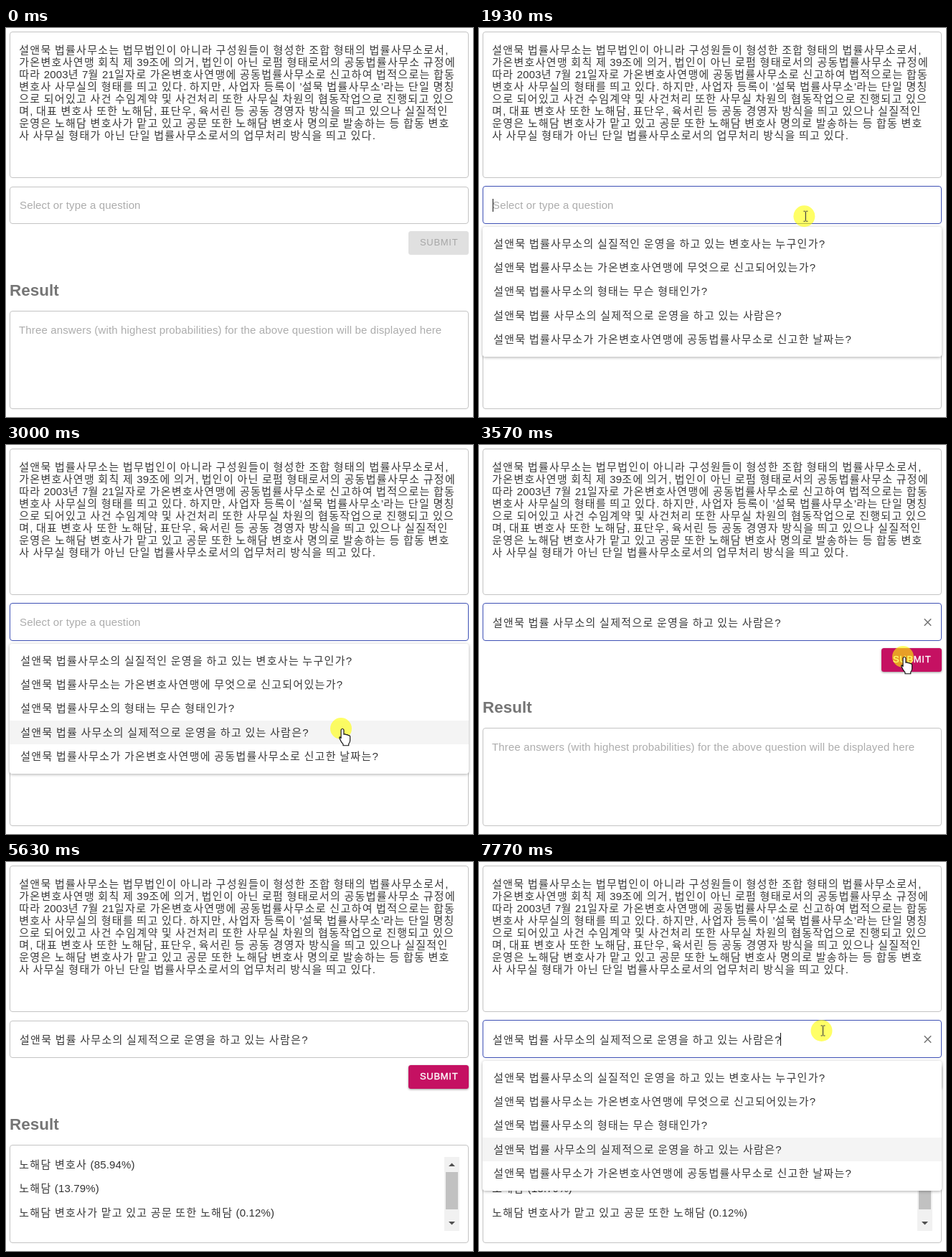
An HTML page for the animation above (8 s loop, 651 by 542 pixels).

```html
<!DOCTYPE html>
<html lang="ko">
<head>
<meta charset="utf-8">
<title>Question answering demo</title>
<style>
  html, body { margin: 0; width: 100%; height: 100%; overflow: hidden; background: #fff; }
  svg { display: block; width: 100%; height: 100%; }
  text {
    font: 15px "Liberation Sans", "Noto Sans CJK KR", "Noto Sans CJK", sans-serif;
    letter-spacing: .14px; fill: #333; white-space: pre;
  }
  .ko { font-weight: 300; letter-spacing: 1.32px; fill: #3a3a3a; }
  .hint { fill: #acacac; }
  .box { fill: #fff; stroke: #c4c4c4; }
  #title { font-size: 22.5px; font-weight: 700; letter-spacing: 0; fill: #757575; }
  #label { font-size: 13px; letter-spacing: .7px; }
  #menu rect.paper { fill: #fff; filter: drop-shadow(0 1px 2px rgba(0,0,0,.32)); }
</style>
</head>
<body>
<svg viewBox="0 0 651 542" xmlns="http://www.w3.org/2000/svg">
  <rect class="box" x="5.5" y="5.5" width="639" height="203" rx="3.5"/>
  <g id="passage"></g>

  <rect id="input" class="box" x="5.5" width="639" rx="3.5"/>
  <text id="ask" class="hint" x="19" y="252">Select or type a question</text>
  <g id="value"></g>
  <path id="clear" d="M620.8 242.3l9.4 9.4m0-9.4l-9.4 9.4" stroke="#757575" stroke-width="1.6"/>
  <path id="caret" stroke="#111"/>

  <rect id="button" x="561" y="283" width="84" height="33" rx="3.5"/>
  <text id="label" x="577" y="303">SUBMIT</text>
  <path id="spinner" fill="none" stroke="#fff" stroke-width="2"/>

  <g id="result">
    <text id="title" x="5" y="373">Result</text>
    <rect class="box" x="5.5" y="394.5" width="639" height="136" rx="3.5"/>
    <text id="wait" class="hint" x="18" y="426">Three answers (with highest probabilities) for the above question will be displayed here</text>
    <g id="answers">
      <rect x="611" y="411" width="21" height="103" fill="#f1f1f1"/>
      <rect x="613" y="432" width="17" height="52" fill="#c1c1c1"/>
      <path d="M617 424h9l-4.500-4.500zM617 501h9l-4.500 4.500z" fill="#505050"/>
    </g>
  </g>

  <g id="menu">
    <rect class="paper" x="5" y="277" width="640" height="181" rx="3.5"/>
    <rect id="active" x="5" y="384" width="640" height="33" fill="#f4f4f4"/>
  </g>

  <g id="pointer">
    <circle id="halo" r="15" fill="#ff0" fill-opacity=".6"/>
    <path id="beam" d="M-1 -7h2.500m1 0h2.500M2 -6.500v13M-1 7h2.500m1 0h2.500" fill="none" stroke="#444" stroke-width="1.2"/>
    <path id="hand" transform="translate(2 .5) scale(.97)" fill="#fff" stroke="#111" stroke-width="1.2" stroke-linejoin="round"
      d="M-2 2a2 2 0 0 1 4 0v6q2-1 3.500.500 2-.500 3 1 2.500-.500 2.500 2v5q0 3-2 5v2.500h-8v-2q-3-3-5-8-1-3 1-2l1 1.500z"/>
    <path id="arrow" fill="#fff" stroke="#111" stroke-linejoin="round" d="M1 0v16l3.700-3.500 2.500 5.700 2.500-1.100-2.500-5.600h5z"/>
  </g>
</svg>
<script>
const LOOP = 8000;
const FOCUS = 1460, HOVER = 2570, PICK = 3060, SEND = 3710, DONE = 5630, REOPEN = 6500;

const passage = [
  '설앤묵 법률사무소는 법무법인이 아니라 구성원들이 형성한 조합 형태의 법률사무소로서,',
  '가온변호사연맹 회칙 제 39조에 의거, 법인이 아닌 로펌 형태로서의 공동법률사무소 규정에',
  '따라 2003년 7월 21일자로 가온변호사연맹에 공동법률사무소로 신고하여 법적으로는 합동',
  '변호사 사무실의 형태를 띄고 있다. 하지만, 사업자 등록이 ’설묵 법률사무소’라는 단일 명칭',
  '으로 되어있고 사건 수임계약 및 사건처리 또한 사무실 차원의 협동작업으로 진행되고 있으',
  '며, 대표 변호사 또한 노해담, 표단우, 육서린 등 공동 경영자 방식을 띄고 있으나 실질적인',
  '운영은 노해담 변호사가 맡고 있고 공문 또한 노해담 변호사 명의로 발송하는 등 합동 변호',
  '사 사무실 형태가 아닌 단일 법률사무소로서의 업무처리 방식을 띄고 있다.'
];
const questions = [
  '설앤묵 법률사무소의 실질적인 운영을 하고 있는 변호사는 누구인가?',
  '설앤묵 법률사무소는 가온변호사연맹에 무엇으로 신고되어있는가?',
  '설앤묵 법률사무소의 형태는 무슨 형태인가?',
  '설앤묵 법률 사무소의 실제적으로 운영을 하고 있는 사람은?',
  '설앤묵 법률사무소가 가온변호사연맹에 공동법률사무소로 신고한 날짜는?'
];
const answers = [
  '노해담 변호사 (85.94%)',
  '노해담 (13.79%)',
  '노해담 변호사가 맡고 있고 공문 또한 노해담 (0.12%)'
];

// Pointer stops: time, x, y
const stops = [
  [810, 612, 330], [1300, 462, 237], [1740, 462, 237], [2510, 406, 401],
  [2700, 406, 401], [2960, 467, 395], [PICK, 467, 395], [3520, 591, 295],
  [6000, 591, 295], [6450, 360, 246], [6750, 360, 246], [7200, 353, 268],
  [7380, 353, 268], [7520, 467, 243], [7700, 467, 243], [7770, 477.5, 235]
];

const $ = id => document.getElementById(id);
const NS = 'http://www.w3.org/2000/svg';
const set = (id, attrs) => {
  for (const k in attrs) $(id).setAttribute(k, attrs[k]);
};
const show = (id, on) => { $(id).style.display = on ? '' : 'none'; };
const ease = u => u * u * (3 - 2 * u);
const within = (p, x0, y0, x1, y1) => p.x >= x0 && p.x <= x1 && p.y >= y0 && p.y <= y1;

function addText(id, str, x, y) {
  const text = document.createElementNS(NS, 'text');
  text.setAttribute('x', x);
  text.setAttribute('y', y);
  for (const run of str.match(/[가-힣]+|[^가-힣]+/g)) {
    const span = document.createElementNS(NS, 'tspan');
    if (/[가-힣]/.test(run)) span.setAttribute('class', 'ko');
    span.textContent = run;
    text.appendChild(span);
  }
  $(id).appendChild(text);
}

passage.forEach((s, i) => addText('passage', s, 18.2, 35.5 + 17 * i));
questions.forEach((s, i) => addText('menu', s, 20.2, 305.5 + 33.4 * i));
answers.forEach((s, i) => addText('answers', s, 18.2, 427 + 33.3 * i));
addText('value', questions[3], 19, 252.5);

function pointerAt(t) {
  let i = 0;
  while (i < stops.length - 1 && stops[i + 1][0] <= t) i++;
  const a = stops[i], b = stops[i + 1] || a;
  const u = a === b ? 0 : ease(Math.max(0, (t - a[0]) / (b[0] - a[0])));
  return {
    x: a[1] + (b[1] - a[1]) * u,
    y: a[2] + (b[2] - a[2]) * u,
    on: t >= 810 && t < 3900 || t >= 6000
  };
}

// Indeterminate ring: rotation plus a growing, then shrinking dash
function spinnerPath(t) {
  const full = 126.9, r = 10, cx = 603, cy = 299.5;
  const p = (t - SEND) / 1400 % 1;
  const e = ease(p * 2 % 1);
  const from = p < .5 ? 15 * e : 15 + 110 * e;
  const to = Math.min(full, from + (p < .5 ? 1 + 99 * e : 100));
  const point = d => {
    const a = 2 * Math.PI * (p + d / full);
    return `${cx + r * Math.cos(a)} ${cy + r * Math.sin(a)}`;
  };
  const large = to - from > full / 2 ? 1 : 0;
  return `M${point(from)}A${r} ${r} 0 ${large} 1 ${point(to)}`;
}

function draw(t) {
  const p = pointerAt(t);
  const open = t >= FOCUS && t < PICK || t >= REOPEN;
  const focused = t >= FOCUS && t < SEND || t >= REOPEN;
  const filled = t >= PICK;
  const loading = t >= SEND && t < DONE;
  const overInput = p.on && within(p, 5, 221, 645, 273);
  const overButton = !open && within(p, 561, 283, 645, 316);
  const enabled = filled && !loading;

  set('input', {
    y: focused ? 220.5 : 221.5,
    height: focused ? 52 : 51,
    style: focused ? 'stroke:#3f51b5' : overInput ? 'stroke:#212121' : ''
  });
  show('ask', !filled);
  show('value', filled);
  show('clear', filled && (focused || overInput));

  const blink = t >= FOCUS && t < 2960 && Math.floor((t - FOCUS) / 500) % 2 === 0;
  show('caret', blink || t >= 7450);
  set('caret', { d: `M${filled ? 420.5 : 19.5} 238v18` });

  set('button', {
    fill: !enabled ? '#e0e0e0' : overButton ? '#c51162' : '#f50057',
    style: enabled ? 'filter:drop-shadow(0 1.5px 1.5px rgba(0,0,0,.4))' : ''
  });
  show('label', !loading);
  set('label', { style: enabled ? 'fill:#fff;stroke:#fff;stroke-width:.4' : 'fill:#a6a6a6' });
  show('spinner', loading);
  if (loading) set('spinner', { d: spinnerPath(t) });

  set('result', { transform: `translate(0 ${loading ? 1 : 0})` });
  show('wait', t < DONE);
  show('answers', t >= DONE);
  show('menu', open);
  show('active', t >= HOVER);

  const hand = open && p.y > 277 || overButton && enabled;
  const beam = !hand && overInput;
  show('pointer', p.on);
  set('pointer', { transform: `translate(${p.x} ${p.y})` });
  show('halo', t < 2500 || t > 2700);
  show('hand', hand);
  show('beam', beam);
  show('arrow', !hand && !beam);
}

const start = performance.now();
function tick() {
  draw((performance.now() - start) % LOOP);
  requestAnimationFrame(tick);
}
tick();
</script>
</body>
</html>
```
